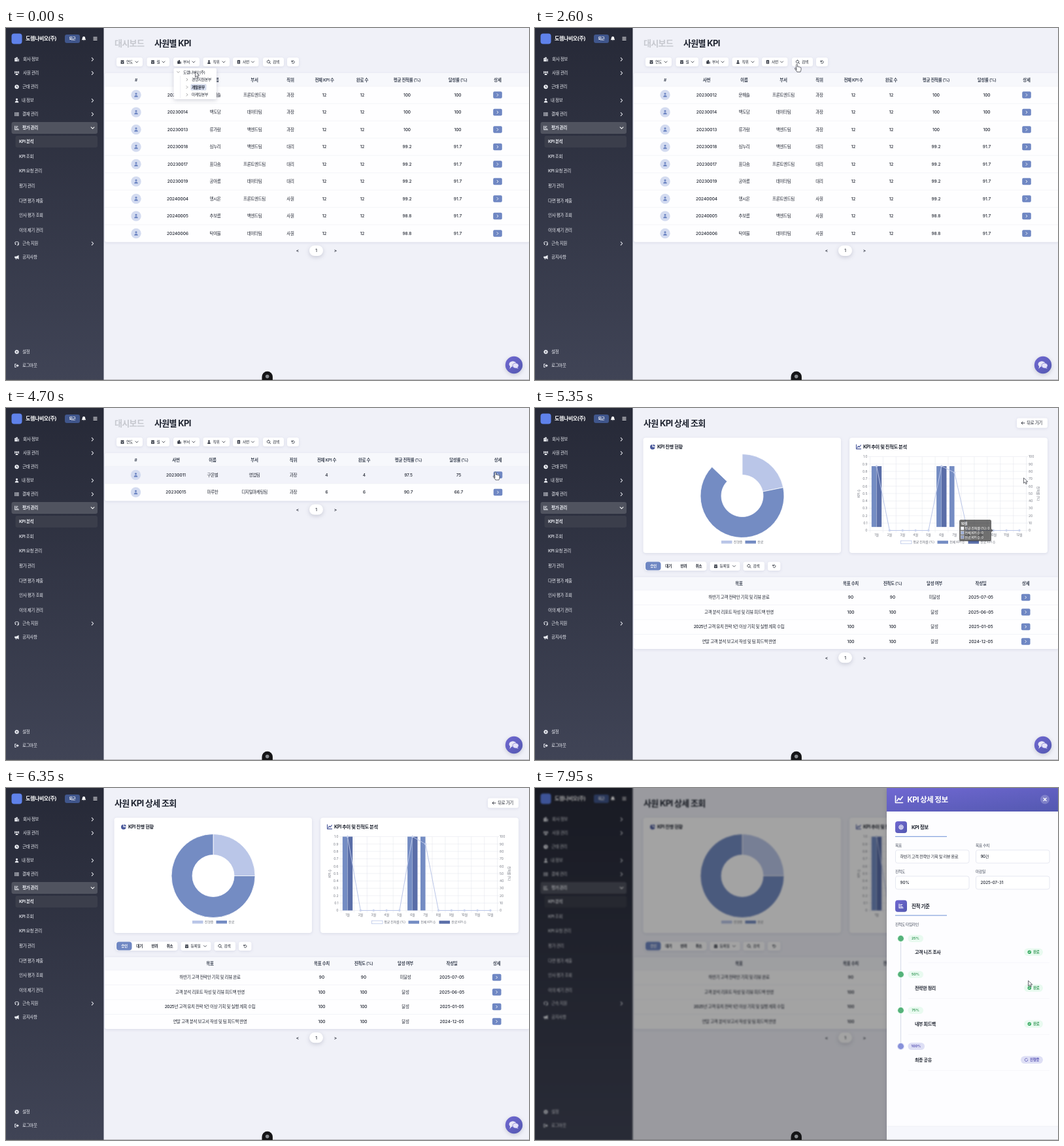
An HTML page for the animation above (8 s loop, 800x539 px).

```html
<!DOCTYPE html>
<html lang="ko">
<head>
<meta charset="utf-8">
<title>KPI</title>
<style>
html, body { margin: 0; width: 100%; height: 100%; overflow: hidden; background: #f0f1f8; }
svg { display: block; width: 800px; height: 539px; }
text { font-family: Inter, "Noto Sans CJK KR", "Noto Sans CJK", sans-serif; white-space: pre; }
.ko { letter-spacing: -.05em; }
.sh { filter: drop-shadow(0 1px 2px rgba(60, 70, 120, .13)); }
.pop { filter: drop-shadow(0 2px 3px rgba(40, 45, 80, .2)); }
</style>
</head>
<body>
<svg id="stage" viewBox="0 0 800 539"></svg>
<script>
const LOOP = 8000;
const INK = '#1f2430', BLUE = '#6f87c3', BAR = '#748cc3', PALE = '#bac6e8', DEEP = '#5a6ea8';

// ---------- drawing helpers ----------
const T = (x, y, s, size = 6.5, w = 500, fill = INK, a = 'start') =>
  `<text x="${x}" y="${(y + size * .36).toFixed(2)}" font-size="${size}" font-weight="${w}" fill="${fill}" text-anchor="${a}"${/[가-힣]/.test(s) ? ' class="ko"' : ''}>${s}</text>`;
const M = (x, y, s, size, w, fill) => T(x, y, s, size, w, fill, 'middle');
const R = (x, y, x2, y2, fill, rx = 0, more = '') =>
  `<rect x="${x}" y="${y}" width="${x2 - x}" height="${y2 - y}" rx="${rx}" fill="${fill}" ${more}/>`;
const C = (x, y, r, fill, more = '') => `<circle cx="${x}" cy="${y}" r="${r}" fill="${fill}" ${more}/>`;
const L = (x, y, x2, y2, c, w = .6) => `<path d="M${x} ${y}L${x2} ${y2}" stroke="${c}" stroke-width="${w}"/>`;
const G = (id, body, more = '') => `<g id="${id}" ${more}>${body}</g>`;
const map = (list, f) => list.map(f).join('');

// icons live in a box from -5 to 5
const SOLID = {
  building: 'M-5 5V-3H-2V-5H2V5ZM3 5V-1H5V5ZM-3.6-1h1v1.4h-1zM-.6-3h1v1.4h-1zM-.6 0h1v1.4h-1z',
  users: 'M0-4a2 2 0 1 1-.01 0ZM-3 4.5c0-5 6-5 6 0ZM-4-4a1.3 1.3 0 1 1-.01 0ZM4-4a1.3 1.3 0 1 1-.01 0ZM-5.5 1c0-2.6 2-2.6 3-1.6L-3.6 1ZM5.5 1c0-2.6-2-2.6-3-1.6L3.6 1Z',
  person: 'M0-5a2.4 2.4 0 1 1-.01 0ZM-4.2 5c0-6 8.4-6 8.4 0Z',
  clock: 'M0-5a5 5 0 1 0 .01 0ZM-.6-3V.6L2 2l.7-1L.6-.4V-3Z',
  list: 'M-5-4h2v2h-2zM-5-1h2v2h-2zM-5 2h2v2h-2zM-2-3.7h7v1.4h-7zM-2-.7h7v1.4h-7zM-2 2.3h7v1.4h-7z',
  chart: 'M-5-5h1.6V3.4H5V5H-5ZM-2-4h5v1.5h-5zM-2-1.4h3v1.4h-3zM-2 1h6v1.4h-6z',
  headset: 'M-5 0a5 5 0 0 1 10 0V3L2 5H0V3.8H2L3.7 2.4V0a3.7 3.7 0 0 0-7.4 0ZM-4-.4h2V3h-2zM2-.4h2V3h-2z',
  horn: 'M-5-2h4L4.6-5V5L-1 2l.6 3h-2L-3 2h-2Z',
  gear: 'M-1-5h2l.5 1.5L3-4.2 4.2-3 3.5-1.5 5-1v2l-1.5.5L4.2 3 3 4.2 1.5 3.5 1 5h-2l-.5-1.5L-3 4.2-4.2 3l.7-1.5L-5 1v-2l1.5-.5L-4.2-3-3-4.2l1.5.7ZM0-1.7a1.7 1.7 0 1 1-.01 0Z',
  exit: 'M-5-4h4v1.4h-2.6v5.2h2.6V4h-4ZM-2-1h3v-2.5L5 0 1 3.5V1h-3Z',
  calendar: 'M-4.4-4h1.5v-1h1.4v1h3v-1h1.4v1h1.5v2.2h-8.8ZM-4.4-1h8.8v6h-8.8ZM-2 1v2h4V1Z',
  badge: 'M-3.8-5h7.6V5h-7.6ZM0-2.6a1.5 1.5 0 1 1-.01 0ZM-2.2 3.2h4.4c0-2.6-4.4-2.6-4.4 0Z',
  bell: 'M0-5c3 0 3.4 2.4 3.4 4.4L5 3H-5l1.6-3.6C-3.4-2.6-3-5 0-5ZM-1.3 3.7h2.6L0 5Z',
  pie: 'M-.6-4.4A4.7 4.7 0 1 0 4.4.6H-.6ZM.8-5A5 5 0 0 1 5-.8H.8Z',
};
const LINE = {
  right: 'M-2-4L2 0L-2 4', down: 'M-4-2L0 2L4-2', burger: 'M-5-4H5M-5 0H5M-5 4H5', cross: 'M-4-4L4 4M4-4L-4 4',
  lens: 'M-1-5a4 4 0 1 0 .01 0M2 2L5 5', reset: 'M-4-4V-1H-1M-3.8-1.2A4.2 4.2 0 1 1-3 3', back: 'M5 0H-5M-1-4L-5 0L-1 4',
  trend: 'M-5-5V4.5H5M-3 2L-.5-1.5L1.5.5L4.8-3.8', target: 'M0-4.6a4.6 4.6 0 1 0 .01 0M0-2a2 2 0 1 0 .01 0',
  check: 'M-3 0L-1 2.4L3-2.4', spin: 'M3-3.4A4.5 4.5 0 1 0 4.5 0',
};
const I = (name, x, y, size, c, w = 1.5) =>
  `<path transform="translate(${x} ${y}) scale(${size / 10})" ` + (SOLID[name]
    ? `d="${SOLID[name]}" fill="${c}" fill-rule="evenodd"/>`
    : `d="${LINE[name]}" fill="none" stroke="${c}" stroke-width="${w}" stroke-linecap="round" stroke-linejoin="round"/>`);

// ---------- sidebar ----------
const COMPANY = '도렘나비오(주)';
const menu = [
  ['회사 정보', 48, 26, 'building', 1], ['사원 관리', 69, 26, 'users', 1], ['근태 관리', 90, 25, 'clock'],
  ['내 정보', 111, 24, 'person', 1], ['결재 관리', 132, 25, 'list', 1], ['평가 관리', 153, 25, 'chart'],
  ['근속 지원', 330, 25, 'headset', 1], ['공지사항', 351, 25, 'horn'], ['설정', 496, 25, 'gear'], ['로그아웃', 517, 25, 'exit'],
];
const subs = ['KPI 분석', 'KPI 조회', 'KPI 요청 관리', '평가 관리', '다면 평가 제출', '인사 평가 조회', '이의 제기 관리'];
const sidebar = R(-4, -4, 149.5, 543, 'url(#side)') + R(8.5, 8.5, 24.5, 24.5, '#5f82ea', 4)
  + T(30, 16.5, COMPANY, 8, 700, '#fff')
  + R(90, 10, 113, 23, '#40568c', 3) + M(101.5, 16.5, '퇴근', 5.5, 700, '#fff')
  + I('bell', 119, 16.3, 6.4, '#fff') + I('burger', 136.5, 16.3, 5.2, '#fff', 1.8)
  + R(8.5, 144, 140, 162, '#50535f', 3) + R(14.5, 165, 140, 183, '#3b3e4b', 3)
  + map(menu, ([s, y, x, icon, more]) => I(icon, 16.5, y, 6.6, '#eceef4')
    + T(x, y, s, 6.5, y == 153 ? 700 : 500, '#eceef4') + (more ? I('right', 132.5, y, 6, '#eceef4', 1.7) : ''))
  + I('down', 132.5, 153, 6, '#fff', 1.7)
  + map(subs, (s, i) => T(20, 174 + 22.55 * i, s, 6.5, i ? 500 : 700, '#eceef4'));

// ---------- shared parts ----------
const pill = (x, x2, icon, s, chev, y = 52) => R(x, y - 6.8, x2, y + 6.8, '#fff', 3, 'class="sh"')
  + (s ? I(icon, x + 9, y, 5.4, INK) + T(x + 15, y, s, 5.75, 500) : I(icon, (x + x2) / 2, y, 5, INK))
  + (chev ? I('down', x2 - 9, y, 5.2, INK, 1.4) : '');
const pager = y => M(446, y, '&lt;', 6.5, 600) + R(464, y - 8, 485, y + 8, '#fff', 8, 'class="pop"')
  + M(474.5, y, '1', 6.5, 500) + M(504, y, '&gt;', 6.5, 600);
const go = (x, y) => R(x - 6.8, y - 5.3, x + 6.8, y + 5.3, BLUE, 2) + I('right', x, y, 4.6, '#fff', 1.9);

function table(id, top, cols, heads, rows, rowH, first) {
  const base = top + 20, end = base + rowH * rows.length;
  let s = R(151, top, 801, end, '#fefeff', 3, 'class="sh"') + R(151, top, 801, base, '#f7f8fc', 3)
    + R(151, base, 801, base + rowH, '#f2f3fa', 0, `id="${id}Hover"`)
    + map(heads, (h, i) => M(cols[i], top + 10, h, 6.5, 600, '#3a4252'));
  rows.forEach((row, r) => {
    const y = first + rowH * r;
    s += L(151, base + rowH * r, 800, base + rowH * r, '#eceef5');
    row.forEach((v, i) => {
      s += v == '@' ? C(cols[i], y, 7.7, '#d3dbf0') + I('person', cols[i], y, 6.6, BLUE)
        : v == '>' ? go(cols[i], y) : M(cols[i], y, v);
    });
  });
  return s + pager(end + 13.3);
}

// ---------- list page ----------
const heads = ['#', '사번', '이름', '부서', '직위', '전체 KPI 수', '완료 수', '평균 진척률 (%)', '달성률 (%)', '상세'];
const FE = '프론트엔드팀', BE = '백엔드팀', DA = '데이터팀';
const staff = [
  [20230012, '문해솔', FE, '과장', 100, 100], [20230014, '백도담', DA, '과장', 100, 100], [20230013, '류가람', BE, '과장', 100, 100],
  [20230018, '심누리', BE, '대리', 99.2, 91.7], [20230017, '표다솜', FE, '대리', 99.2, 91.7], [20230019, '공아롬', DA, '대리', 99.2, 91.7],
  [20240004, '맹시온', FE, '사원', 99.2, 91.7], [20240005, '추보름', BE, '사원', 98.8, 91.7], [20240006, '탁여울', DA, '사원', 98.8, 91.7],
].map(([no, name, team, pos, avg, done]) => ['@', no, name, team, pos, 12, 12, avg, done, '>']);
const found = [
  ['@', 20230011, '구온별', '영업팀', '과장', 4, 4, 97.5, 75, '>'],
  ['@', 20230015, '마루한', '디지털마케팅팀', '과장', 6, 6, 90.7, 66.7, '>'],
];
const depts = ['경영지원본부', '개발본부', '마케팅본부'];
const ranks = ['전체', '대표이사', '이사', '부장', '과장', '대리', '사원'];
const deptMenu = R(256.5, 61.5, 322, 109, '#fff', 2, 'class="pop"') + L(266.5, 73, 266.5, 107, '#e4e6ee')
  + R(282.5, 85.8, 306.5, 95.4, '#d6ddee', 1.5, 'id="deptMark"')
  + I('down', 263.5, 67.5, 4.6, '#555', 1.2) + T(271, 67.5, COMPANY, 5.75, 400)
  + map(depts, (s, i) => I('right', 277, 79 + 11.6 * i, 4.6, '#555', 1.2)
    + T(284, 79 + 11.6 * i, s, 5.75, i == 1 ? 600 : 400));
const rankMenu = R(301.5, 61.5, 366, 155, '#fff', 2, 'class="pop"') + R(301.5, 61.5, 366, 75, '#f1f1f4', 0, 'id="rankHover"')
  + map(ranks, (s, i) => T(308, 68.2 + 13.4 * i, s, 5.75, 400));
const listPage = T(166, 23, '대시보드', 13, 700, '#c6c8cf') + T(227, 23, '사원별 KPI', 13, 700)
  + pill(169, 209, 'calendar', '연도', 1) + pill(215.5, 250, 'calendar', '월', 1) + pill(256, 296, 'building', '부서', 1)
  + pill(301.5, 342, 'person', '직위', 1) + pill(347, 386.5, 'badge', '사번', 1) + pill(393, 425, 'lens', '검색') + pill(430, 448, 'reset')
  + G('all', table('all', 69.2, [199, 262.5, 320, 380, 435, 487, 545, 613.5, 691, 752], heads, staff, 26.5, 102.5))
  + G('hits', table('hits', 69.2, [198.5, 260, 316, 380, 439.5, 490.5, 548, 615.5, 692.5, 752.5], heads, found, 26.5, 102.5))
  + G('deptMenu', deptMenu) + G('rankMenu', rankMenu);

// ---------- detail page ----------
const X0 = 512.5, X1 = 751.5, Y0 = 187.5, Y1 = 74.5, GREY = '#777b85';
const ten = [...Array(11).keys()], months = [...Array(12).keys()];
const monthX = i => 522.5 + 19.86 * i;
const key = (x, y, c, s, more) => R(x, y - 2.3, x + 16.5, y + 2.3, c, 0, more) + T(x + 18.8, y, s, 5.1, 400, GREY);
const tip = R(649, 171, 698, 204, '#000', 2.5, 'opacity=".8"') + '<path d="M698 185l2.8 2.5-2.8 2.5z" opacity=".8"/>'
  + T(651.5, 177, '10월', 5.2, 700, '#fff')
  + map([['평균 진척률 (%): 0', '#eef1fa'], ['전체 KPI 수: 0', BAR], ['완료 KPI 수: 0', DEEP]], ([s, c], i) =>
    R(651.5, 182 + 6.7 * i, 656, 186.6 + 6.7 * i, c, 0, 'stroke="#fff" stroke-width=".4"') + T(657.5, 184.4 + 6.7 * i, s, 5.1, 400, '#fff'));
const goals = [
  ['하반기 고객 전략안 기획 및 리뷰 완료', 90, 90, '미달성', '2025-07-05', '>'],
  ['고객 분석 리포트 작성 및 리뷰 피드백 반영', 100, 100, '달성', '2025-06-05', '>'],
  ['2025년 고객 유치 전략 1건 이상 기획 및 실행 계획 수립', 100, 100, '달성', '2025-01-05', '>'],
  ['연말 고객 분석 보고서 작성 및 팀 피드백 반영', 100, 100, '달성', '2024-12-05', '>'],
];
const detailPage = T(166, 23, '사원 KPI 상세 조회', 13, 700)
  + R(737, 15.5, 784, 30.5, '#fff', 3, 'class="sh"') + I('back', 746.5, 23, 5, INK, 1.7) + T(752, 23, '뒤로 가기')
  + R(165.5, 45.5, 468, 222, '#fff', 4, 'class="sh"') + R(481, 45.5, 784, 222, '#fff', 4, 'class="sh"')
  + I('pie', 180, 59.5, 8, '#4b5a9c') + T(187, 59.5, 'KPI 진행 현황', 7.25, 700)
  + I('trend', 495, 59.5, 7, '#4b5a9c', 1.6) + T(502, 59.5, 'KPI 추이 및 진척도 분석', 7.25, 700)
  + G('donut', '') + key(285, 205.3, PALE, '진행중') + key(321.5, 205.3, BAR, '완료')
  + map(ten, i => {
    const y = Y0 - 11.3 * i;
    return L(X0 - 3, y, X1 + 3, y, '#e6e8ee') + T(508.5, y, i ? (i / 10).toFixed(1) : '0', 5.1, 400, GREY, 'end') + T(755, y, i * 10, 5.1, 400, GREY);
  })
  + map([...months, 12], i => L(X0 + 19.92 * i, Y1, X0 + 19.92 * i, Y0 + 3, '#e6e8ee'))
  + map(months, i => M(monthX(i), 194.5, i + 1 + '월', 5.1, 400, GREY))
  + `<g transform="translate(495 131) rotate(-90)">${M(0, 0, 'KPI 수', 5.1, 400, GREY)}</g>`
  + `<g transform="translate(770 131) rotate(90)">${M(0, 0, '진척률 (%)', 5.1, 400, GREY)}</g>`
  + G('plot', '')
  + key(559.5, 205.5, '#fff', '평균 진척률 (%)', `stroke="${PALE}" stroke-width=".8"`)
  + key(615.5, 205.5, BAR, '전체 KPI 수') + key(662.5, 205.5, DEEP, '완료 KPI 수') + G('tip', tip)
  + R(168, 235.2, 262.5, 249, '#fff', 4, 'class="sh"') + R(169, 235.6, 192.5, 248.6, BLUE, 4)
  + map(['승인', '대기', '반려', '취소'], (s, i) => M(181 + 23.2 * i, 242.2, s, 5.6, 600, i ? INK : '#fff'))
  + pill(267.5, 313.5, 'calendar', '등록일', 1, 242.2) + pill(318.5, 351, 'lens', '검색', 0, 242.2) + pill(356, 375.5, 'reset', '', 0, 242.2)
  + table('goal', 259, [312, 483, 547, 611, 682, 750.7], ['목표', '목표 수치', '진척도 (%)', '달성 여부', '작성일', '상세'], goals, 22.5, 290);

function slice(a, b, fill) {
  const pt = (r, k) => `${317 + r * Math.sin(k)} ${134.5 - r * Math.cos(k)}`, big = +(b - a > Math.PI);
  return `<path d="M${pt(64, a)}A64 64 0 ${big} 1 ${pt(64, b)}L${pt(32, b)}A32 32 0 ${big} 0 ${pt(32, a)}Z" fill="${fill}" stroke="#fff" stroke-width=".8"/>`;
}
const rates = [100, 0, 0, 0, 0, 100, 90, 0, 0, 0, 0, 0];
function drawCharts(p) {
  const full = 2 * Math.PI * p, mix = (a, b) => a + (b - a) * p;
  $('donut').innerHTML = p > 0 ? slice(0, full / 4, PALE) + slice(full / 4, full, BAR) : '';
  const top = mix(Y0, Y1), low = mix(146, Y0);
  const bar = (x, c) => low > top ? R(x, top, x + 7.6, low, c) : '';
  const pts = rates.map((v, i) => [monthX(i), mix(Y0, Y0 - 1.13 * v)]);
  $('plot').innerHTML = map([0, 5, 6], i => bar(monthX(i) - 7.7, BAR) + (i < 6 ? bar(monthX(i) + .1, DEEP) : ''))
    + `<path d="M${pts.join('L')}" fill="none" stroke="${PALE}" stroke-width="1"/>`
    + map(pts, ([x, y]) => C(x, y, 1.4, '#cdd6ee', `stroke="${PALE}" stroke-width=".5"`));
}

// ---------- drawer ----------
const section = (y, icon, s) => R(551, y - 9, 569, y + 9, 'url(#violet)', 4) + I(icon, 560, y, 7, '#fff', 1.5)
  + T(576, y, s, 7.5, 700) + L(551, y + 14.3, 630, y + 14.3, '#6c8fd6', 1);
const field = (x, y, label, s) => T(x, y, label, 5.7, 500, '#3a4252')
  + R(x + .5, y + 7, x + 113, y + 27, '#fff', 3, 'stroke="#e0e3ee" stroke-width=".8"') + T(x + 7.5, y + 17, s, 6.2, 500);
const steps = ['고객 니즈 조사', '전략안 정리', '내부 피드백', '최종 공유'];
const drawer = R(538, 0, 802, 539, '#fdfdff', 0, 'class="pop"') + R(538, 0, 802, 36, 'url(#violet)') + R(538, 518, 802, 539, '#f6f7fc')
  + L(538, 518, 800, 518, '#e6e8f0')
  + I('trend', 557, 17.5, 11, '#fff', 1.5) + T(569.5, 17.5, 'KPI 상세 정보', 11.6, 700, '#fff')
  + C(780, 17.5, 7, '#fff', 'fill-opacity=".22"') + I('cross', 780, 17.5, 5, '#fff', 2.4)
  + section(60, 'target', 'KPI 정보') + field(551, 88, '목표', goals[0][0]) + field(674, 88, '목표 수치', '90건')
  + field(551, 128, '진척도', '90%') + field(674, 128, '마감일', '2025-07-31')
  + section(180.8, 'chart', '진척 기준') + T(551, 209, '진척도 타임라인', 5.7, 500, '#3a4252')
  + L(559.5, 230, 559.5, 395, '#d9deea', 1.2)
  + map(steps, (s, i) => {
    const y = 230.5 + 55 * i, last = i == 3, c = last ? '#5a55b5' : '#3a9b5c', bg = last ? '#dedff5' : '#e9faf0';
    return C(559.5, y, 5.6, bg) + C(559.5, y, 4.4, last ? '#8791da' : '#55b27a')
      + R(570.5, y - 5.6, last ? 596 : 594, y + 5.6, bg, 5.6) + M(last ? 583 : 582, y, 25 * (i + 1) + '%', 5.3, 700, c)
      + T(581, y + 20.8, s, 7, 600) + L(571, y + 37, 787, y + 37, '#f3f4f9')
      + R(last ? 743 : 748, y + 15, 777, y + 26.6, bg, 5.8)
      + (last ? I('spin', 751.5, y + 20.8, 5.2, c, 1.5) : C(756.3, y + 20.8, 2.8, '#3fae68') + I('check', 756.3, y + 20.8, 3.6, '#fff', 2))
      + T(last ? 757 : 762, y + 20.8, last ? '진행중' : '완료', 5.5, 600, c);
  });

// ---------- stage ----------
const grad = (id, dir, a, b) => `<linearGradient id="${id}" ${dir}><stop stop-color="${a}"/><stop offset="1" stop-color="${b}"/></linearGradient>`;
const fab = C(777, 516, 13.2, 'url(#violet)', 'class="pop"')
  + '<path d="M773 519l-2.5 3 .6-4a5.6 4.6 0 1 1 9.500-2z" fill="#fff" opacity=".85"/><path d="M775 517.500a4.600 3.800 0 1 1 7.600 2.200l1.500 2.200-3.200-1a4.600 3.800 0 0 1-5.900-3.400z" fill="#e4e2fa" stroke="#6660c4" stroke-width=".6"/>';
const hand = '<path d="M-1.800 5V-3c0-1.300 2-1.300 2 0V0.200c.5-.7 1.800-.5 1.900.3.600-.6 1.700-.3 1.800.5.700-.5 1.700 0 1.700 1V4.500c0 1.600-1 2.200-1 3.400H-.600C-1 6.600-3.800 4-4.100 2.800c-.3-1 .9-1.500 2.300.2Z" transform="translate(0 -1.500)"/>';
const arrow = '<path d="M0 0V8.200L2 6.400 3.400 9.500 4.800 8.900 3.500 5.900H6.200Z" transform="translate(-1.500 -3)"/>';

const $ = id => document.getElementById(id);
$('stage').innerHTML = '<defs>' + grad('side', 'x1="0" y1="0" x2="0" y2="1"', '#262937', '#404456')
  + grad('violet', 'x1="0" y1="0" x2="1" y2="1"', '#7068d2', '#5358b0') + '</defs>'
  + G('page', R(-4, -4, 804, 543, '#f0f1f8') + G('list', listPage) + G('detail', detailPage) + sidebar + fab)
  + R(0, 0, 800, 539, '#000', 0, 'id="shade"') + G('drawer', drawer)
  + R(0, 538.4, 800, 539, '#555', 0, 'opacity=".6"')
  + '<path d="M391.500 539V534a8.200 8.200 0 0 1 16.400 0V539Z" fill="#141416"/>' + C(399.7, 533.6, 2.8, '#85888c')
  + G('cursor', G('hand', hand) + G('arrow', arrow), 'fill="#fff" stroke="#33363f" stroke-width=".75" stroke-linejoin="round"');

// ---------- motion ----------
const path = [
  [0, 291, 70], [350, 291, 78], [700, 293, 102], [900, 293, 102], [1250, 325, 56], [1370, 326, 58], [1600, 336, 92], [1950, 335, 121],
  [2200, 335, 121], [2700, 409, 54], [3000, 411, 54], [3600, 494, 67], [4250, 748, 103], [4950, 750, 104], [5350, 749, 110],
  [5580, 705, 180], [5750, 715, 150], [6050, 735, -20], [6400, 738, -20], [6900, 748, 250], [7120, 750, 291], [7350, 760, 302], [8000, 756, 298],
];
const clamp = v => Math.max(0, Math.min(1, v));
const ramp = (t, a, b) => clamp((t - a) / (b - a));
const within = (t, a, b) => t >= a && t < b;
function pointer(t) {
  const i = Math.max(1, path.findIndex(k => k[0] >= t)), [a, x, y] = path[i - 1], [b, x2, y2] = path[i];
  const u = ramp(t, a, b), s = u * u * (3 - 2 * u);
  return [x + (x2 - x) * s, y + (y2 - y) * s];
}
const show = (id, on) => $(id).style.display = on ? '' : 'none';

function draw(t) {
  const [x, y] = pointer(t), searched = t >= 2950, detail = t >= 4900;
  show('list', !detail);
  show('detail', detail);
  show('all', !searched);
  show('hits', searched);
  show('allHover', false);
  show('hitsHover', within(t, 4000, 4900));
  show('goalHover', within(t, 7020, 7900));
  show('deptMenu', t < 950);
  $('deptMark').setAttribute('y', t < 800 ? 85.8 : 97.4);
  $('deptMark').setAttribute('width', t < 800 ? 24 : 29);
  show('rankMenu', within(t, 1350, 2200));
  const row = Math.floor((pointer(t - 90)[1] - 61.5) / 13.4);
  show('rankHover', row >= 0 && row < 7);
  $('rankHover').setAttribute('y', 61.5 + 13.4 * row);

  if (detail) drawCharts(1 - (1 - ramp(t, 4950, 5950)) ** 4);
  $('tip').setAttribute('opacity', .95 * ramp(t, 5210, 5400) * (1 - ramp(t, 5700, 5900)));

  const open = 1 - (1 - ramp(t, 7430, 7780)) ** 3;
  show('drawer', open > 0);
  $('drawer').setAttribute('transform', `translate(${262 * (1 - open)} 0)`);
  $('shade').setAttribute('opacity', .36 * open);
  $('page').style.filter = open > 0 ? `blur(${1.2 * open}px)` : 'none';

  const click = within(t, 1150, 2300) || within(t, 2600, 3750) || within(t, 4250, 4950) || within(t, 7080, 7250);
  show('hand', click);
  show('arrow', !click);
  $('cursor').setAttribute('transform', `translate(${x} ${y})`);
}

const start = performance.now();
(function frame() {
  draw((performance.now() - start) % LOOP);
  requestAnimationFrame(frame);
})();
</script>
</body>
</html>
```
